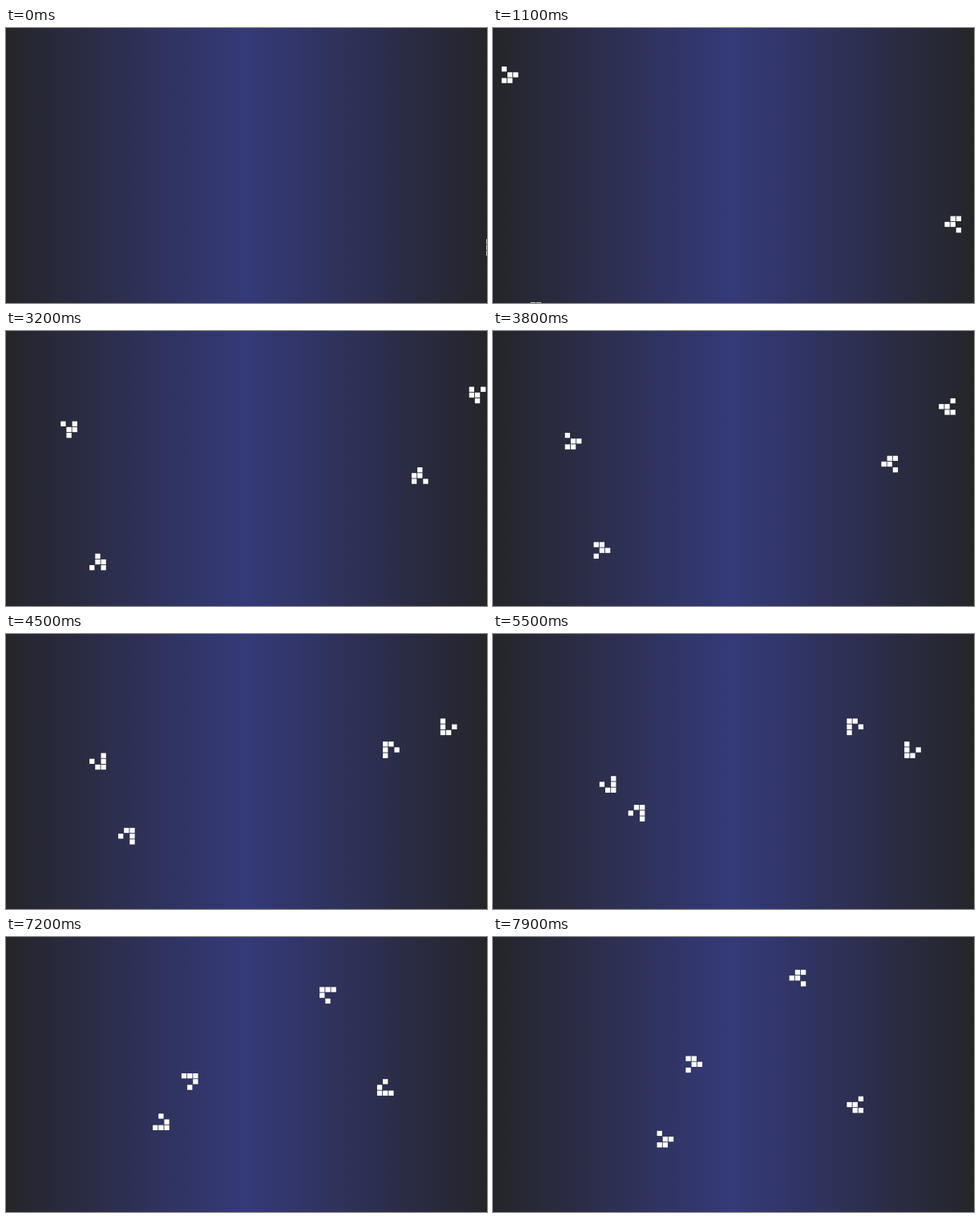
An HTML page with a canvas for the animation above (8 s loop, 600 by 343 pixels).

```html
<!DOCTYPE html>
<html lang="en">
<head>
<meta charset="utf-8">
<title>Gliders</title>
<style>
  html, body { margin: 0; width: 100%; height: 100%; overflow: hidden; }
  body { background: linear-gradient(90deg, #252529, #353a79 50%, #252529); }
  canvas { display: block; }
</style>
</head>
<body>
<canvas id="stage" width="600" height="343"></canvas>
<script>
  const ctx = document.getElementById('stage').getContext('2d');
  const LOOP = 8000, TICK = 100;
  const PITCH = 7.176, CELL = 6.3, LEFT = 3.65, TOP = 5;

  // The four phases of a glider heading down and right: [dx, dy, rows]
  const phases = [
    [0, 0, ['.X.', '..X', 'XXX']],
    [0, 1, ['X.X', '.XX', '.X.']],
    [0, 1, ['..X', 'X.X', '.XX']],
    [1, 1, ['X..', '.XX', 'XX.']]
  ];

  // Mirror images of the same glider, placed on the grid
  const gliders = [
    (x, y) => [x, y],
    (x, y) => [91 - x, y - 6],
    (x, y) => [x + 5, 55 - y],
    (x, y) => [81 - x, 40 - y]
  ];

  // Steady pace, with a short lag before the 1.95 s mark
  function generation(ms) {
    const s = Math.floor(ms / TICK) * TICK / 1000;
    return Math.floor(15.75 * (s - 2.1) + 0.55 - (s < 1.95 ? 1.45 : 0));
  }

  function draw(gen) {
    const shift = Math.floor(gen / 4);
    const [dx, dy, rows] = phases[gen - shift * 4];
    ctx.clearRect(0, 0, 600, 343);
    ctx.fillStyle = '#fff';
    rows.forEach((row, j) => [...row].forEach((mark, i) => {
      if (mark !== 'X') return;
      for (const place of gliders) {
        const [x, y] = place(5 + shift + dx + i, 10 + shift + dy + j);
        ctx.fillRect(LEFT + x * PITCH, TOP + y * PITCH, CELL, CELL);
      }
    }));
  }

  const start = performance.now();
  function frame() {
    draw(generation((performance.now() - start) % LOOP));
    requestAnimationFrame(frame);
  }
  frame();
</script>
</body>
</html>
```
